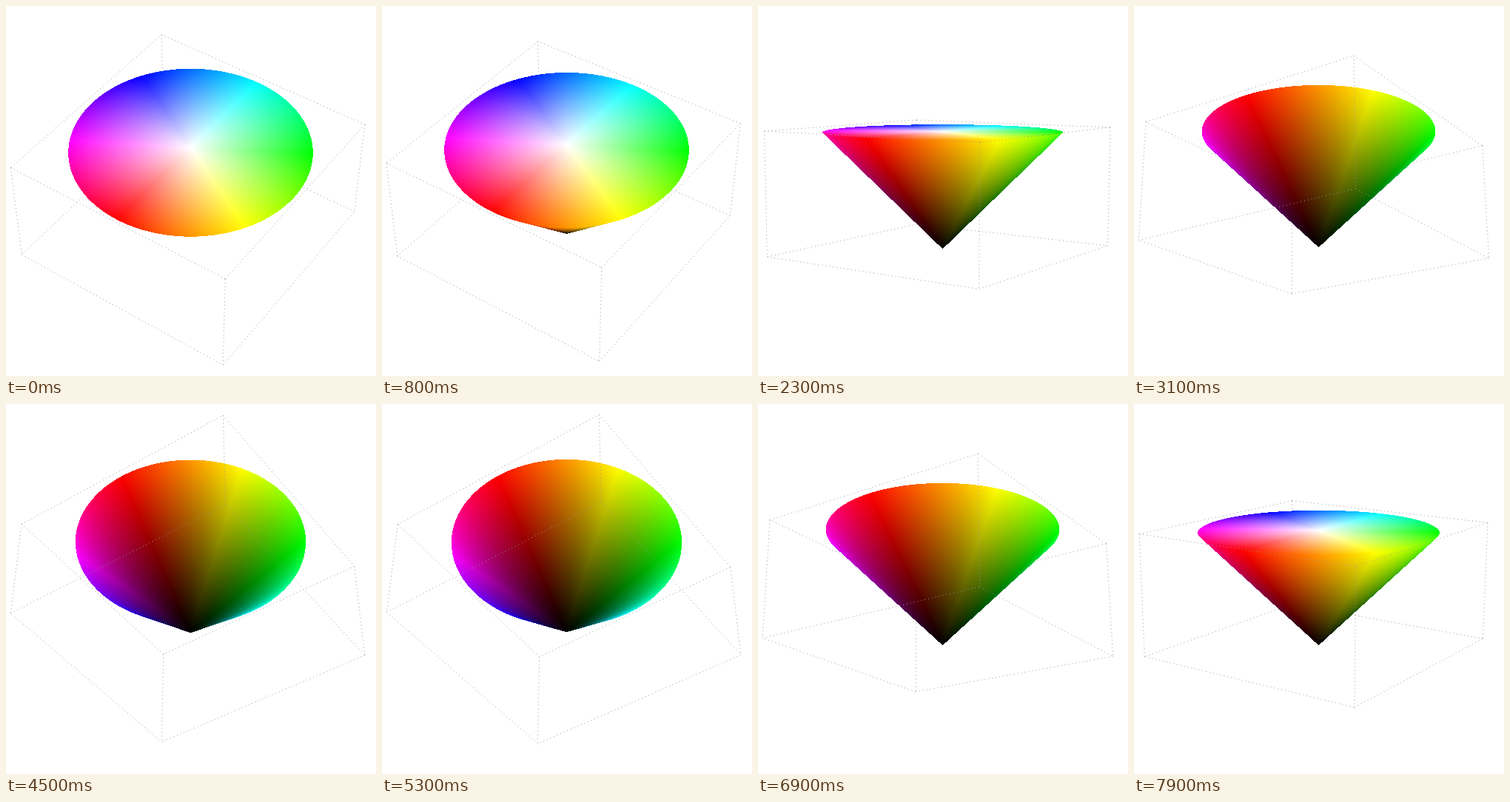
Write an HTML page with a canvas that moves like this. It is 500x500 px and loops after 8 s.

```html
<!DOCTYPE html>
<html lang="en">
<head>
<meta charset="utf-8">
<title>HSV cone</title>
<style>
  html, body { margin: 0; width: 100%; height: 100%; overflow: hidden; background: #fff; }
  canvas { display: block; width: 500px; height: 500px; }
</style>
</head>
<body>
<canvas id="stage" width="500" height="500"></canvas>
<script>
const LOOP = 8000, STEP = 100, SWING = 10000;
const MID = 249.5;             // screen centre
const DIST = 1332;             // horizontal camera distance
const RADIUS = 160, TOP = 80;  // cone: rim at +TOP, apex at -TOP
const BOX_DIAG = 235.4, BOX_H = 83;
const TURN = 10.1 * Math.PI / 180;
const HUE_SHIFT = 34.9 / 60;
const WIN = { x: 80, y: 66, w: 340, h: 270 };

const ctx = document.getElementById('stage').getContext('2d');
const layer = document.createElement('canvas');
layer.width = WIN.w;
layer.height = WIN.h;
const layerCtx = layer.getContext('2d');
const image = layerCtx.createImageData(WIN.w, WIN.h);

function cameraAt(time) {
  const z = DIST * Math.cos(2 * Math.PI * time / SWING);
  const range = Math.hypot(DIST, z);
  return { z, range, sin: z / range, cos: DIST / range };
}

// Axes: x to the right, y towards the camera, z up.
function project([x, y, z], cam) {
  const depth = y * cam.cos + z * cam.sin;
  const k = cam.range / (cam.range - depth);
  return { x: MID + x * k, y: MID - (z * cam.cos - y * cam.sin) * k, depth };
}

function setPixel(i, x, y, sat, val) {
  const hue = Math.atan2(x, y) * 3 / Math.PI + HUE_SHIFT + 6;
  for (let c = 0; c < 3; c++) {
    const k = (5 - 2 * c + hue) % 6;
    image.data[i + c] = 255 * val * (1 - sat * Math.max(0, Math.min(k, 4 - k, 1)));
  }
  image.data[i + 3] = 255;
}

function castRay(i, sx, sy, cam) {
  const dx = sx, dy = -sy * cam.sin - DIST, dz = sy * cam.cos - cam.z;

  if (cam.z > TOP && dz < 0) {
    const s = (TOP - cam.z) / dz;
    const x = s * dx, y = DIST + s * dy, rho = Math.hypot(x, y);
    if (rho <= RADIUS) return setPixel(i, x, y, rho / RADIUS, 1);
  }

  const w = cam.z + TOP;       // camera height above the apex
  const a = dx * dx + dy * dy - dz * dz;
  const b = DIST * dy - w * dz;
  const c = DIST * DIST - w * w;
  const disc = b * b - a * c;
  if (disc < 0) return;
  const root = Math.sqrt(disc);
  const hits = [(-b - root) / a, (-b + root) / a].sort((p, q) => p - q);
  for (const s of hits) {
    const height = w + s * dz;
    if (s > 0 && height >= 0 && height <= 2 * TOP) {
      return setPixel(i, s * dx, DIST + s * dy, 1, height / (2 * TOP));
    }
  }
}

function drawCone(cam) {
  image.data.fill(0);
  for (let row = 0, i = 0; row < WIN.h; row++) {
    const sy = MID - (WIN.y + row + 0.5);
    for (let col = 0; col < WIN.w; col++, i += 4) {
      castRay(i, WIN.x + col + 0.5 - MID, sy, cam);
    }
  }
  layerCtx.putImageData(image, 0, 0);
  ctx.drawImage(layer, WIN.x, WIN.y);
}

function corner(n, z) {
  const angle = TURN + n * Math.PI / 2;
  return [BOX_DIAG * Math.sin(angle), BOX_DIAG * Math.cos(angle), z];
}

const edges = [0, 1, 2, 3].flatMap(n => [
  [corner(n, BOX_H), corner(n + 1, BOX_H)],
  [corner(n, -BOX_H), corner(n + 1, -BOX_H)],
  [corner(n, BOX_H), corner(n, -BOX_H)]
]);

function drawEdges(cam, front) {
  ctx.strokeStyle = '#999';
  ctx.lineWidth = 1;
  ctx.setLineDash([1, 4]);
  for (const [from, to] of edges) {
    const p = project(from, cam), q = project(to, cam);
    if ((p.depth + q.depth > 0) !== front) continue;
    ctx.beginPath();
    ctx.moveTo(p.x, p.y);
    ctx.lineTo(q.x, q.y);
    ctx.stroke();
  }
}

function render(time) {
  const cam = cameraAt(time);
  ctx.fillStyle = '#fff';
  ctx.fillRect(0, 0, 500, 500);
  drawEdges(cam, false);
  drawCone(cam);
  drawEdges(cam, true);
}

const start = performance.now();
let shown = -1;
function tick() {
  const elapsed = (performance.now() - start) % LOOP;
  const time = Math.floor(elapsed / STEP) * STEP;
  if (time !== shown) render(shown = time);
  requestAnimationFrame(tick);
}
tick();
</script>
</body>
</html>
```
